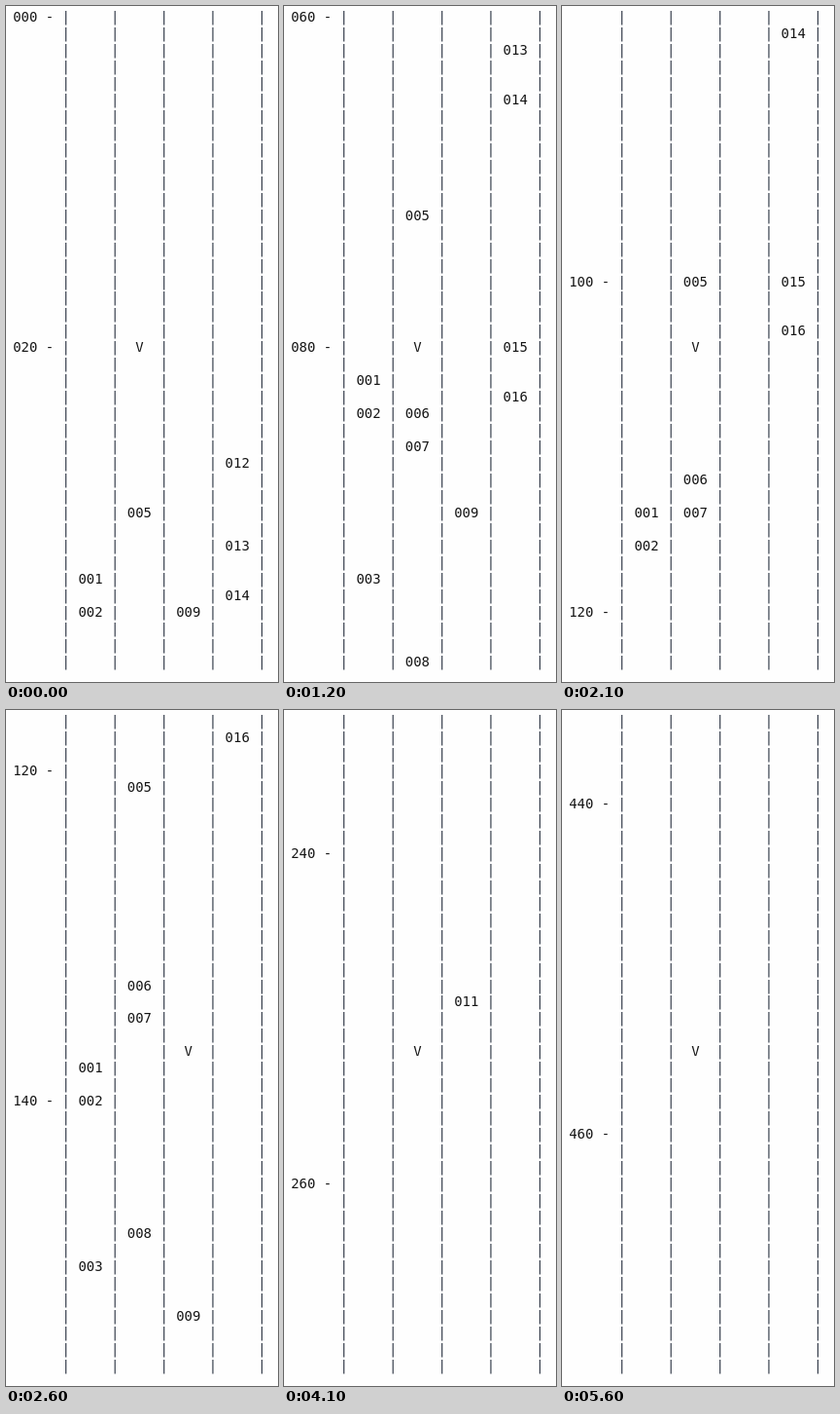
Animation, 280 px wide and 694 px high, one loop 5.7 s. Source, as an HTML page with a canvas:

```html
<!DOCTYPE html>
<html lang="en">
<head>
<meta charset="utf-8">
<title>Text road</title>
<style>
  html, body { margin: 0; width: 100%; height: 100%; overflow: hidden; background: #fefefe; }
  canvas { display: block; }
</style>
</head>
<body>
<canvas id="road" width="280" height="694"></canvas>
<script>
const ctx = document.getElementById('road').getContext('2d', { alpha: false });
const LOOP = 5700, FRAME = 100, TICK = 2.02;   // TICK is in frames
const ROWS = 40, CAR_ROW = 20;
const COL_W = 8.4, ROW_H = 16.97, LEFT = 7.2, BASE = 16;

// Each lane: cells per tick, then the starting row of every car in it.
const lanes = [
  { speed: 8, starts: [34, 36, 46, 53] },
  { speed: 7, starts: [30, 42, 44, 57] },
  { speed: 9, starts: [36, 51, 69] },
  { speed: 5, starts: [27, 32, 35, 50, 53] }
];
// The player brakes in traffic, then gains 2 each tick on the open road.
const traffic = [13, 13, 11, 9, 7, 7, 5, 5, 7, 7, 9, 11, 13, 15, 15, 13];
const signals = { 1: 'V:', 5: ':V', 11: 'V:', 16: ':V' };

const pad = n => String(n).padStart(3, '0');

function scrollAt(tick) {
  let top = 0;
  for (let i = 0; i < tick; i++) top += traffic[i] ?? 15 + 2 * (i - traffic.length);
  return top;
}

function playerLane(tick) {
  return (tick >= 2 && tick < 6) || (tick >= 12 && tick < 17) ? 2 : 1;
}

function put(text, col, row) {
  ctx.fillText(text, LEFT + col * COL_W, BASE + row * ROW_H);
}

function draw(tick) {
  const top = scrollAt(tick), mine = playerLane(tick);
  ctx.fillStyle = '#fefefe';
  ctx.fillRect(0, 0, 280, 694);
  ctx.font = '13.95px "DejaVu Sans Mono", monospace';

  ctx.fillStyle = '#323a48';
  for (let row = 0; row < ROWS; row++)
    for (let i = 0; i <= lanes.length; i++) put('|', 6 + 6 * i, row);

  ctx.fillStyle = '#161616';
  for (let row = 0; row < ROWS; row++)
    if ((top + row) % 20 === 0) put(pad(top + row) + ' -', 0, row);

  let id = 0;
  lanes.forEach(({ speed, starts }, lane) => {
    for (const start of starts) {
      const row = start + speed * tick - top;
      id++;
      const covered = lane === mine && row === CAR_ROW;
      if (row >= 0 && row < ROWS && !covered) put(pad(id), 8 + 6 * lane, row);
    }
  });

  const text = signals[tick] || 'V';
  put(text, 9 + 6 * mine - text.indexOf('V'), CAR_ROW);
}

const start = performance.now();
function loop() {
  const frame = Math.floor(((performance.now() - start) % LOOP) / FRAME);
  draw(Math.floor((frame + 0.4) / TICK));
  requestAnimationFrame(loop);
}
loop();
</script>
</body>
</html>
```
